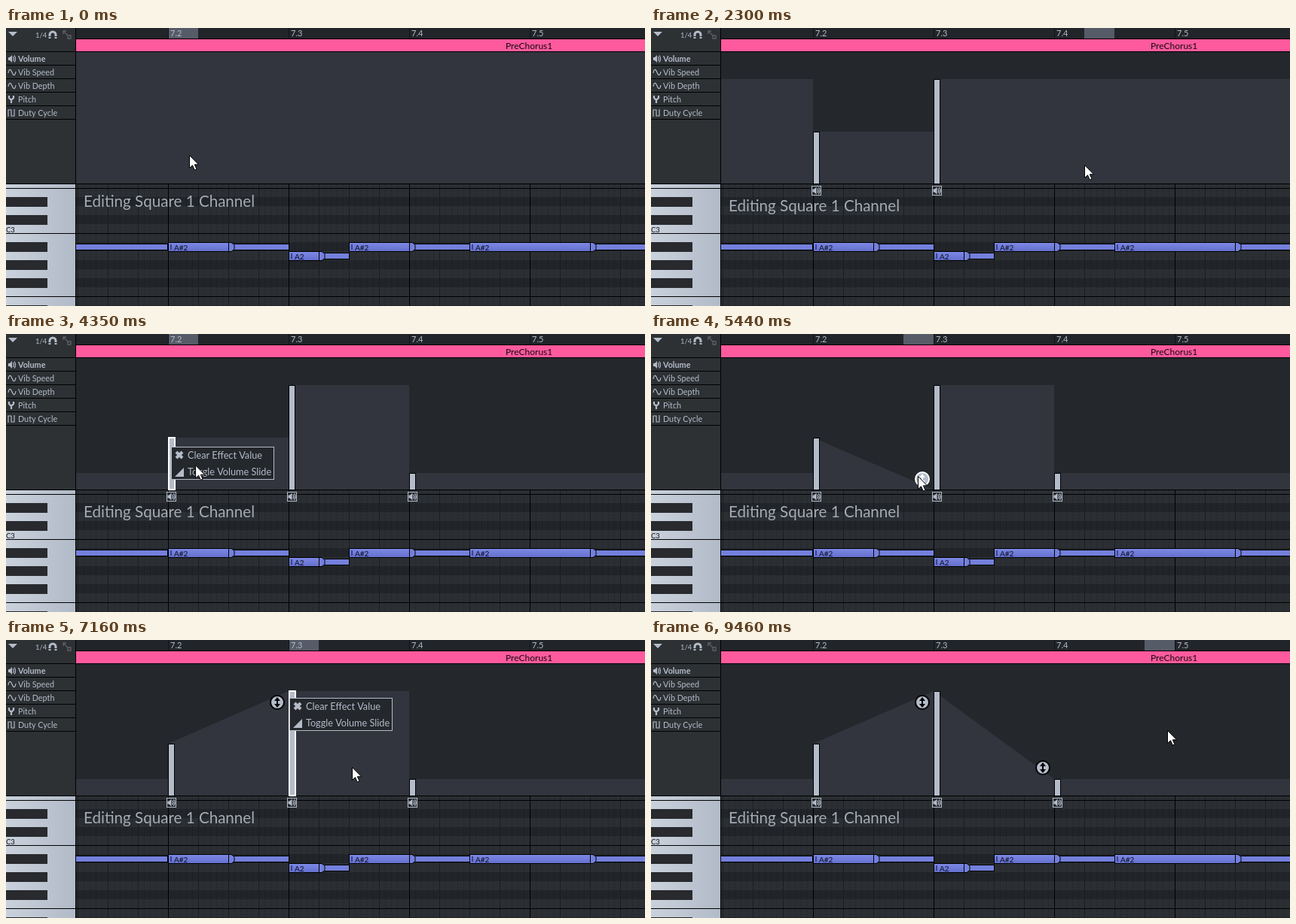
Recreate the animation shown at these times as an HTML page with a canvas. Size 848 by 370 pixels, loop 9.54 s.

```html
<!DOCTYPE html>
<html lang="en">
<head>
<meta charset="utf-8">
<title>Volume slides</title>
<style>
html, body { margin: 0; height: 100%; overflow: hidden; background: #24272b; }
canvas { display: block; }
</style>
</head>
<body>
<canvas id="stage" width="848" height="370"></canvas>
<script>
const ctx = document.getElementById('stage').getContext('2d');
const LOOP = 9540, W = 848, H = 370, LEFT = 93, TOP = 32, FLOOR = 207;
const LIGHT = '#b4bcca', DARK = '#24272b', PANEL = '#2d3134', FILL = '#32353d';

// Pointer moves: start, x, y and, for slow ones, the duration
const moves = [
  [70, 219, 160, 320], [470, 219, 138, 230], [800, 319, 98],
  [1190, 379, 84], [1440, 379, 68, 260], [1750, 425, 92],
  [2040, 575, 183], [2370, 539, 180], [2540, 539, 185], [2740, 242, 156, 360],
  [3240, 226, 154], [3490, 212, 152], [3800, 219, 150], [4060, 262, 184, 390],
  [4750, 372, 190], [5010, 363, 196], [5280, 354, 190], [5520, 355, 46, 280],
  [5880, 355, 82, 190], [6370, 377, 77, 270], [6880, 459, 170], [7240, 442, 112, 320],
  [7800, 534, 193, 390], [8340, 516, 192], [8500, 516, 169, 490], [9300, 685, 121, 150]
];

// Bars are set by dragging the pointer from `from` to `to`.
const bars = [
  { from: 1440 - 1050, to: 700, slideAt: 4750 },
  { from: 1440, to: 1700, slideAt: 7800 },
  { from: 2540, to: 2700, slideAt: Infinity }
].map((b, i) => ({ ...b, x: 215 + i * 160 }));

const menus = [{ from: 4060, to: 4750, x: 219, y: 150 }, { from: 6850, to: 7800, x: 376, y: 77 }];

function ramp(t, start, length, a, b) {
  return a + (b - a) * Math.max(0, Math.min(1, (t - start) / length));
}

function pointer(t) {
  let x = 243, y = 170;
  for (const [start, nx, ny, length] of moves) {
    if (t < start) break;
    const time = length || Math.min(260, 60 + Math.hypot(nx - x, ny - y) * 1.5);
    x = ramp(t, start, time, x, nx);
    y = ramp(t, start, time, y, ny);
  }
  return [x, y];
}

// Slides begin at zero; the first is pulled to the top before it settles.
function slideEnd(i, t) {
  if (i) return ramp(t, 8500, 490, 208, 185);
  return t < 5880 ? ramp(t, 5510, 290, 208, TOP) : ramp(t, 5880, 190, TOP, 68);
}

function rect(x, y, w, h, color) {
  ctx.fillStyle = color;
  ctx.fillRect(x, y, w, h);
}

function frame(x, y, w, h, color, width = 1) {
  ctx.strokeStyle = color;
  ctx.lineWidth = width;
  ctx.strokeRect(x, y, w, h);
}

function text(s, x, y, size, color = LIGHT, weight = 400) {
  ctx.font = `${weight} ${size}px Lato, "Open Sans", sans-serif`;
  ctx.fillStyle = color;
  ctx.fillText(s, x, y);
}

// Draws an SVG path moved to x, y
function shape(d, x, y, fill, stroke, width = 1) {
  const path = new Path2D(d);
  ctx.save();
  ctx.translate(x, y);
  if (fill) { ctx.fillStyle = fill; ctx.fill(path); }
  if (stroke) { ctx.strokeStyle = stroke; ctx.lineWidth = width; ctx.stroke(path); }
  ctx.restore();
}

function gradient(w, h, from, to, y = 0) {
  const g = ctx.createLinearGradient(0, y, w, y + h);
  g.addColorStop(0, from);
  g.addColorStop(1, to);
  return g;
}

function speaker(x, y) {
  shape('M-5-2H-3L0-5V5L-3 2H-5Z', x, y, LIGHT);
  shape('M1.5-3Q3 0 1.5 3M3-4.5Q6 0 3 4.5', x, y, null, LIGHT, 1.2);
}

function timeline(column) {
  rect(LEFT, 0, W, 14, '#212529');
  rect(column, 0, 40, 14, '#565b68');
  for (let i = 0; i < 4; i++) {
    rect(215 + i * 160, 0, 1, 14, '#111315');
    text('7.' + (i + 2), 218 + i * 160, 11, 11);
  }
  rect(LEFT, 14, W, 18, '#000');
  rect(LEFT, 15, W, 16, '#ff5a9d');
  text('PreChorus1', 663, 28, 12, '#16090f');
}

function sidebar() {
  rect(0, 0, 92, 208, PANEL);
  shape('M0 0H12L6 6Z', 3, 5, LIGHT);
  text('1/4', 39, 13, 9.5);
  shape('M-4 5V0A4 4 0 0 1 4 0V5', 62, 9, null, LIGHT, 3);
  rect(56, 11, 12, 1, PANEL);
  shape('M-5-1V-5H-1M-5-5L1 1M1 1H5V5H1Z', 81, 9, null, '#5d6165', 1.3);
  const wave = 'M-5 1C-4-5-2-5 0 0S4 5 5-1';
  const icons = [null, wave, wave, 'M-4-5V-2L-1 1L2-2V-5M-1 0V5', 'M-5 5V-4H-1V4H3V-5'];
  ['Volume', 'Vib Speed', 'Vib Depth', 'Pitch', 'Duty Cycle'].forEach((name, i) => {
    const y = 41 + i * 18;
    rect(0, y - 10, 92, 1, '#000');
    text(name, 16, y + 4, 10.8, LIGHT, i ? 400 : 700);
    if (i) shape(icons[i], 8, y, null, LIGHT, i === 3 ? 2.2 : 1.2);
    else speaker(8, y);
  });
  rect(0, 121, 92, 1, '#000');
}

function piano() {
  rect(0, 208, 92, H, gradient(92, 0, '#c9d1dc', '#b1bac7'));
  rect(LEFT, 208, W, H, '#2b2f33');
  for (const y of [225, 249, 285, 309, 333, 369]) {
    rect(0, y, 55, 13, '#282a2e');
    rect(LEFT, y, W, 12, '#212428');
  }
  ctx.setLineDash([2, 2]);
  for (let x = 95; x < W; x += 8) shape('M.5 208V370', x, 0, null, 'rgba(0,0,0,.2)');
  ctx.setLineDash([]);
  for (let x = 95; x < W; x += 40) rect(x, 208, 1, H, (x - 215) % 160 ? '#1b1e21' : '#000');
  for (const y of [213, 273, 357]) rect(0, y, W, 1, '#000');
  text('C3', 0, 271.5, 9.5, '#111');
}

function tail(x, end, y) {
  rect(x, y + 1, end - x, 9, '#000');
  rect(x, y + 2, end - x - 1, 7, '#7480dc');
}

function note(label, x, w, end, y) {
  tail(x + w + 8, end, y);
  shape('M0 0H4L8 3V9L4 12H0Z', x + w, y - .5, '#7480dc', '#000');
  rect(x, y - 1, w + 1, 13, '#000');
  rect(x + 1, y, w - 1, 11, gradient(0, 12, '#7c88e4', '#626ecb', y));
  rect(x + 3, y + 2, 2, 7, '#3c458f');
  text(label, x + 8, y + 9.5, 10, '#0b0d1c');
}

function notes() {
  tail(LEFT, 215, 286);
  note('A#2', 215, 80, 376, 286);
  note('A2', 375, 40, 456, 298);
  note('A#2', 455, 80, 616, 286);
  note('A#2', 615, 160, 849, 286);
}

function knob(x, y, ink) {
  ctx.beginPath();
  ctx.arc(x, y, 9, 0, 7);
  ctx.fillStyle = LIGHT;
  ctx.fill();
  ctx.strokeStyle = ink;
  ctx.lineWidth = 2;
  ctx.stroke();
  shape('M0-7L4-2H1V2H4L0 7L-4 2H-1V-2H-4Z', x, y, ink);
}

function menu({ x, y }) {
  rect(x, y, 137, 44, DARK);
  frame(x + .5, y + .5, 136, 43, LIGHT);
  shape('M-4-4L4 4M4-4L-4 4', x + 11, y + 11, null, LIGHT, 4);
  shape('M0 12H12V0Z', x + 5, y + 28, LIGHT);
  text('Clear Effect Value', x + 22, y + 16, 12.7);
  text('Toggle Volume Slide', x + 22, y + 38, 12.7);
}

function effects(t, mx, my) {
  const live = bars.filter(b => t >= b.from).map((b, i) => {
    const y = pointer(Math.min(t, b.to))[1], sliding = t >= b.slideAt;
    return { x: b.x, y, sliding, end: sliding ? slideEnd(i, t) : y };
  });
  rect(LEFT, TOP, W, FLOOR - TOP, DARK);
  // The level before the first bar carries over from the last one.
  const last = live.length ? live[live.length - 1].y : TOP;
  rect(LEFT, last, (live.length ? 215 : W) - LEFT, FLOOR - last, FILL);
  live.forEach((b, i) => {
    const next = i + 1 < live.length ? live[i + 1].x : W;
    shape(`M${b.x} ${FLOOR}V${b.y}L${next} ${Math.min(b.end, FLOOR)}V${FLOOR}Z`, 0, 0, FILL);
  });
  rect(0, FLOOR, W, 1, '#000');
  for (const b of live) {
    const over = mx >= b.x && mx < b.x + 9 && my >= b.y - 2 && my < FLOOR;
    rect(b.x, b.y, 9, FLOOR - b.y + 1, '#000');
    rect(b.x + 1, b.y + 1, 7, FLOOR - b.y - 1, LIGHT);
    if (over) frame(b.x + 1, b.y, 8, FLOOR - b.y, '#fff', 2);
    rect(b.x - 2, 210, 13, 13, DARK);
    frame(b.x - 1.5, 210.5, 12, 12, LIGHT);
    speaker(b.x + 4.5, 216.5);
  }
  for (const b of live.filter(b => b.sliding)) {
    const x = b.x + 145, y = b.end + Math.max(-15, Math.min(15, b.y - b.end));
    knob(x, y, Math.hypot(mx - x, my - y) < 12 ? '#fff' : '#000');
  }
  text('Editing Square 1 Channel', 103, live.length ? 244 : 238, 20.6, '#a5abb3');
}

function draw(now) {
  const t = now % LOOP;
  const [x, y] = pointer(t);
  const open = menus.find(m => t >= m.from && t < m.to);
  // An open menu holds the hover state where it was opened.
  const [hx, hy] = open ? pointer(open.from) : [x, y];
  timeline(215 + Math.floor((hx - 215) / 40) * 40);
  sidebar();
  piano();
  notes();
  effects(t, hx, hy);
  rect(92, 0, 1, H, '#000');
  if (open) menu(open);
  shape('M0 0V17L4 13.3L6.8 19.5L9.5 18.3L6.8 12.3H12Z', x + .5, y - .5, '#fff', '#000');
  requestAnimationFrame(draw);
}
requestAnimationFrame(draw);
</script>
</body>
</html>
```
